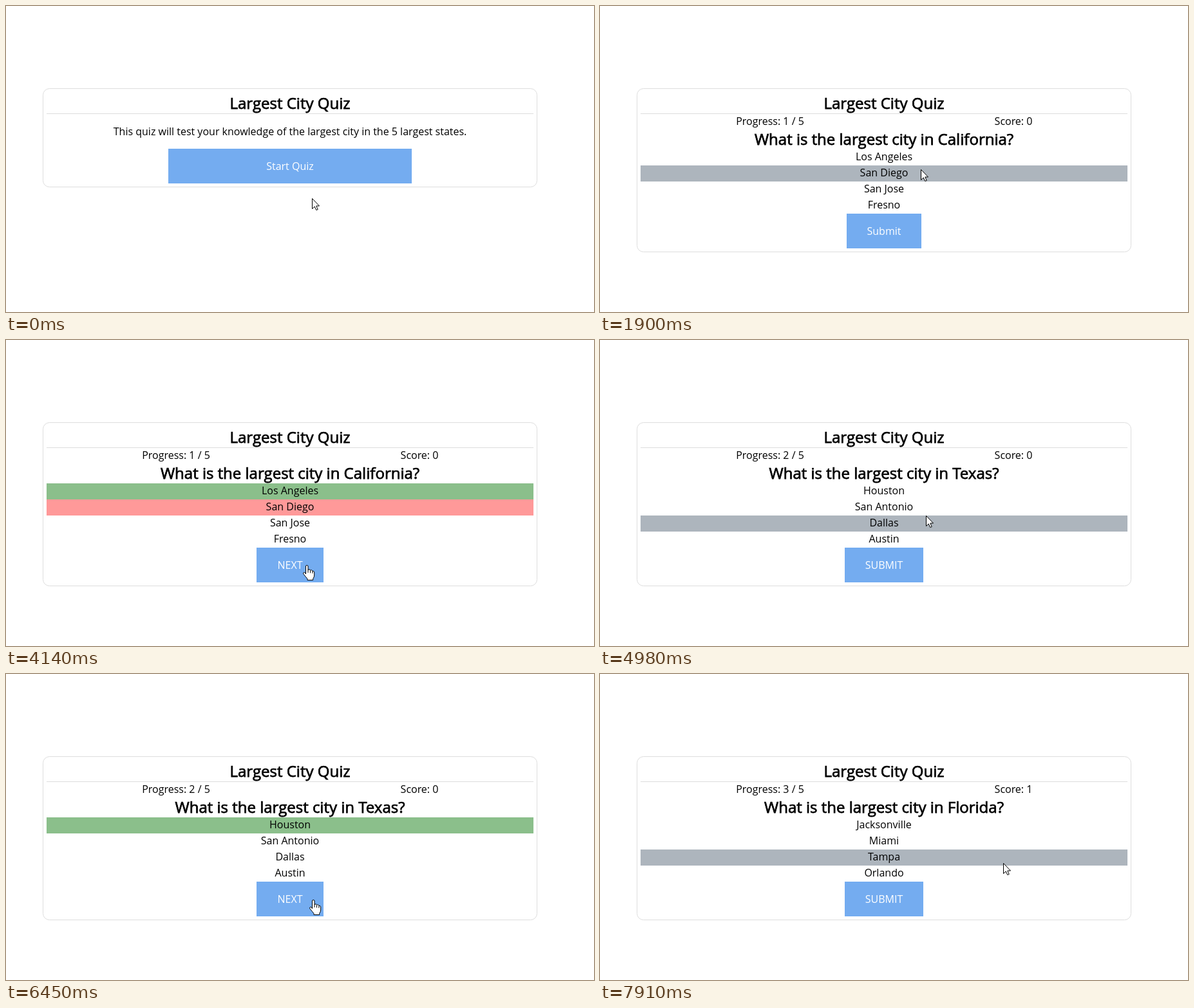
An HTML page that plays this animation: 913x476 px, repeating every 7990 ms.

```html
<!DOCTYPE html>
<html lang="en">
<head>
<meta charset="utf-8">
<title>Largest City Quiz</title>
<style>
  html, body { margin: 0; width: 100%; height: 100%; overflow: hidden; background: #fff; }
  svg { display: block; width: 913px; height: 476px; }
  text { font: 16px "Open Sans", sans-serif; text-anchor: middle; fill: #000; }
  .big { font-size: 24px; stroke: #000; stroke-width: .75px; }
  .label { fill: #fff; }
  .line { fill: none; stroke: #ddd; }
  .cursor path { fill: #fff; stroke: #000; stroke-linejoin: round; }
  #beam path { fill: none; }
</style>
</head>
<body>
<svg viewBox="0 0 913 476">
  <rect id="card" class="line" x="57.5" y="128.5" width="767" height="153" rx="10"/>
  <text class="big" x="441" y="160">Largest City Quiz</text>
  <path class="line" d="M63 167.5H819"/>
  <text id="intro" x="441" y="201">This quiz will test your knowledge of the largest city in the 5 largest states.</text>
  <g id="quiz">
    <text id="progress" x="264" y="185"></text>
    <text id="score" x="642" y="185"></text>
    <text id="question" class="big" x="441" y="216"></text>
    <g id="rows"></g>
  </g>
  <rect id="button" height="54" fill="#74acf0"/>
  <text id="label" class="label" x="441"></text>
  <g id="arrow" class="cursor">
    <path d="M.5.5V16.5L4.2 13L6.8 18.5L9.2 17.5L6.8 12H11.5Z"/>
  </g>
  <g id="hand" class="cursor">
    <path d="M-1.5 14V2Q-1.5.5 .2.5Q2 .5 2 2V8Q2.5 6.6 4 6.9Q5.4 7.2 5.5 8.6Q6.3 7.5 7.6 8Q8.8 8.4 8.9 9.8Q10 9.1 11 9.9Q11.8 10.5 11.7 12V16Q11.6 19 9.7 21.3V23.5H1V21.5Q-1.5 18.5-4.8 14.4Q-6 12.8-4.8 11.8Q-3.7 10.9-2.6 12.1Z"/>
    <path d="M2 8V12M5.5 9V12.5M8.9 10V13"/>
  </g>
  <g id="beam" class="cursor">
    <path d="M-3.5-8.5H-1.5L.5-7.5L2.5-8.5H3.5M.5-7.5V7.5M-3.5 8.5H-1.5L.5 7.5L2.5 8.5H3.5"/>
  </g>
</svg>
<script>
const LOOP = 7990, ROW_TOP = 223, ROW_H = 25;
const GREY = '#adb5bd', GREEN = '#8bbf8b', RED = '#ff9999';
const $ = id => document.getElementById(id);

// at: shown, picked: option clicked, checked: answer revealed
const quizzes = [
  { at: 900, state: 'California', cities: ['Los Angeles', 'San Diego', 'San Jose', 'Fresno'],
    pick: 1, picked: 2600, checked: 3910, submit: ['Submit', 116], score: 0 },
  { at: 4750, state: 'Texas', cities: ['Houston', 'San Antonio', 'Dallas', 'Austin'],
    pick: 0, picked: 5490, checked: 6220, submit: ['SUBMIT', 122], score: 0 },
  { at: 6830, state: 'Florida', cities: ['Jacksonville', 'Miami', 'Tampa', 'Orlando'],
    pick: -1, picked: LOOP, checked: LOOP, submit: ['SUBMIT', 122], score: 1 }
];

// pointer moves: first step, last step, number of steps, end x, end y
const moves = [
  [70, 210, 3, 477, 266], [440, 440, 1, 476, 261],
  [1130, 1290, 3, 480, 236], [1360, 1600, 4, 492, 288],
  [1750, 1820, 2, 497, 240], [1900, 1900, 1, 498, 254], [1980, 1980, 1, 498, 242],
  [2210, 2290, 2, 498, 254], [2440, 2440, 1, 498, 255], [2520, 2520, 1, 490, 252],
  [2670, 2670, 1, 499, 255], [2750, 3050, 5, 470, 375], [3130, 3360, 4, 461, 354],
  [3990, 3990, 1, 463, 352], [4140, 4140, 1, 467, 350],
  [4600, 4680, 2, 470, 361], [4830, 4980, 3, 506, 273], [5050, 5140, 2, 505, 256],
  [5370, 5450, 2, 492, 236], [5530, 5750, 4, 478, 340],
  [6220, 6450, 4, 477, 351], [6830, 7060, 4, 520, 262], [7130, 7370, 4, 575, 300],
  [7440, 7520, 2, 592, 282], [7690, 7910, 4, 626, 294]
];
const presses = [670, 3680, 4600, 5980, 6600];

const rows = [0, 1, 2, 3].map(i => {
  const add = (tag, attrs) => {
    const el = document.createElementNS('http://www.w3.org/2000/svg', tag);
    set(el, attrs);
    return $('rows').appendChild(el);
  };
  const y = ROW_TOP + i * ROW_H;
  return {
    bar: add('rect', { x: 63, y, width: 756, height: ROW_H }),
    text: add('text', { x: 441, y: y + 17 })
  };
});

function set(el, attrs) {
  for (const key in attrs) el.setAttribute(key, attrs[key]);
}

function write(el, text) {
  if (el.textContent !== text) el.textContent = text;
}

function show(el, on) {
  el.style.display = on ? '' : 'none';
}

function pointer(t) {
  let x = 475, y = 299;
  for (const [from, to, n, endX, endY] of moves) {
    if (t < from) break;
    const step = n > 1 ? Math.floor((t - from) / (to - from) * (n - 1) + .01) : 0;
    const part = Math.min(1, (step + 1) / n);
    x += (endX - x) * part;
    y += (endY - y) * part;
  }
  return [Math.round(x), Math.round(y)];
}

function drawButton(text, width, top, pressed) {
  write($('label'), text);
  set($('label'), { y: top + 33 });
  set($('button'), {
    x: 441 - width / 2, y: top, width,
    stroke: pressed ? '#74acf0' : 'none'
  });
}

function draw(t) {
  const [x, y] = pointer(t);
  const quiz = quizzes.filter(q => t >= q.at).pop();
  const pressed = presses.some(p => t >= p && t < p + 80);
  const hover = Math.floor((y - ROW_TOP) / ROW_H);
  const onRow = quiz && hover >= 0 && hover < 4;
  let width = 378, top = 222, text = 'Start Quiz';

  show($('intro'), !quiz);
  show($('quiz'), quiz);
  set($('card'), { height: quiz ? 254 : 153 });

  if (quiz) {
    const checked = t >= quiz.checked;
    top = 323;
    [text, width] = checked ? ['NEXT', 104] : quiz.submit;
    write($('progress'), `Progress: ${quizzes.indexOf(quiz) + 1} / 5`);
    write($('score'), `Score: ${quiz.score}`);
    write($('question'), `What is the largest city in ${quiz.state}?`);
    rows.forEach((row, i) => {
      const picked = t >= quiz.picked && i === quiz.pick;
      let fill = picked || (onRow && i === hover) ? GREY : 'none';
      if (checked) fill = i === 0 ? GREEN : picked ? RED : 'none';
      set(row.bar, { fill });
      write(row.text, quiz.cities[i]);
    });
  }
  drawButton(text, width, top, pressed);

  const onButton = Math.abs(x - 441) < width / 2 && y >= top && y < top + 54;
  const kind = onButton ? 'hand' : onRow && Math.abs(x - 441) < 52 ? 'beam' : 'arrow';
  for (const id of ['arrow', 'hand', 'beam']) show($(id), id === kind);
  set($(kind), { transform: `translate(${x} ${y})` });
}

const start = performance.now();
function tick(now) {
  draw(Math.max(0, now - start) % LOOP);
  requestAnimationFrame(tick);
}
draw(0);
requestAnimationFrame(tick);
</script>
</body>
</html>
```
